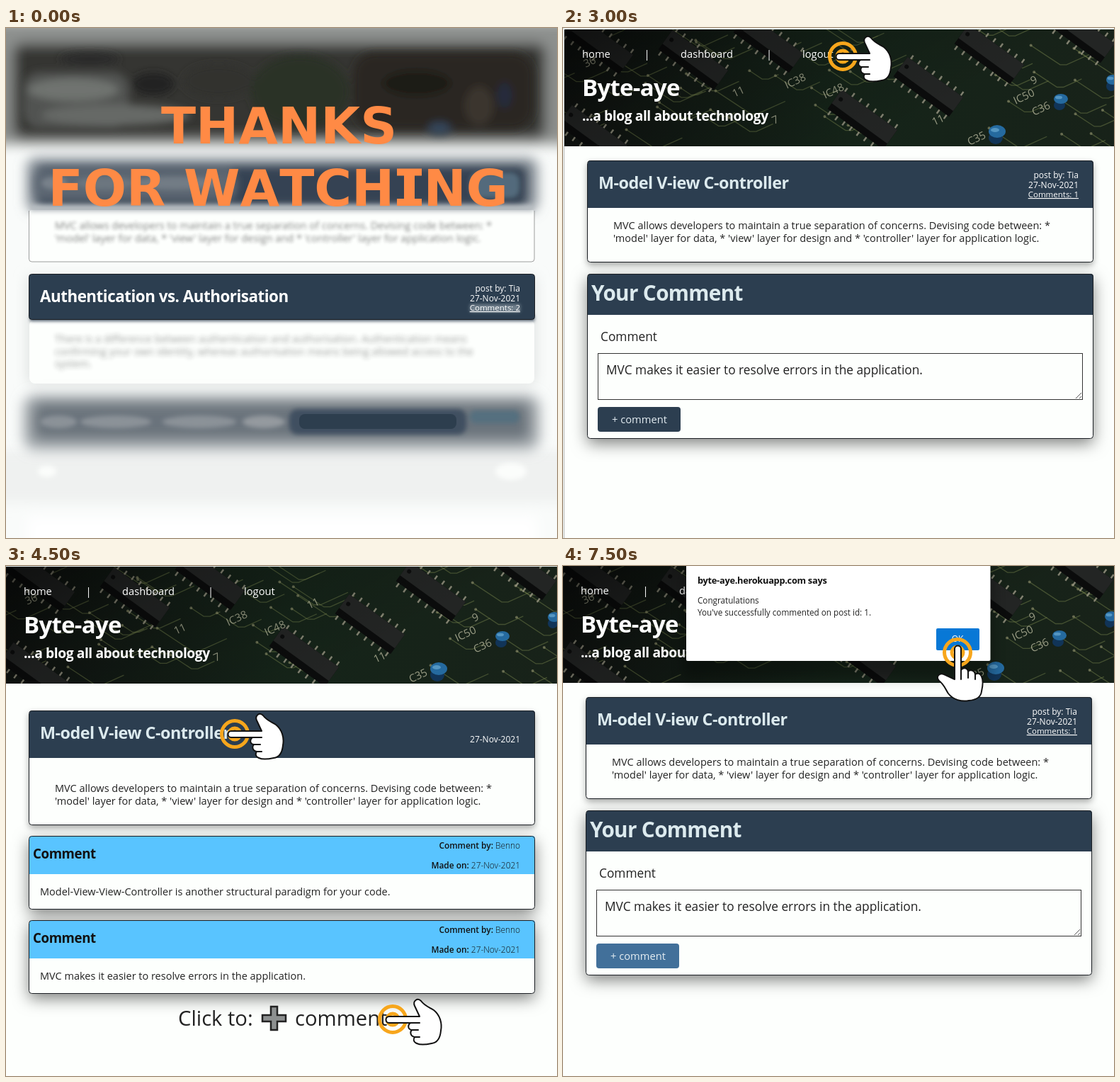
Recreate the animation shown at these times as an HTML page. Size 778 by 720 pixels, loop 8000 ms.

```html
<!DOCTYPE html>
<html lang="en">
<head>
<meta charset="utf-8">
<title>Blog walkthrough</title>
<style>
  html, body { margin: 0; width: 100%; height: 100%; overflow: hidden; background: #fdfffd; }
  svg { display: block; width: 778px; height: 720px; }
  text { font-family: "Open Sans", "Noto Sans", sans-serif; white-space: pre; }
  .b { font-weight: 700; letter-spacing: -.022em; }
  .big text { font: 700 72px "DejaVu Sans", sans-serif; font-kerning: none; }
  .card { filter: drop-shadow(0 4px 5px rgba(0, 0, 0, .36)); }
  .deep { filter: drop-shadow(0 7px 11px rgba(0, 0, 0, .5)); }
</style>
</head>
<body>
<svg id="stage" viewBox="0 0 778 720" xmlns="http://www.w3.org/2000/svg"></svg>
<script>
const NAVY = '#2c3e50', INK = '#222', PALE = '#dceaee';
const stage = document.getElementById('stage');

let seed = 11;
const rnd = () => (seed = (seed * 16807) % 2147483647) / 2147483647;

const text = (x, y, s, size = 14.5, fill = INK, attrs = '') =>
  `<text x="${x}" y="${y}" font-size="${size}" fill="${fill}" ${attrs}>${s}</text>`;
const bold = (x, y, s, size, fill = '#fff') => text(x, y, s, size, fill, 'class="b"');
const right = (y, s, size = 12, fill = '#fff', attrs = '') =>
  text(726, y, s, size, fill, `text-anchor="end" ${attrs}`);
const rect = (x, y, w, h, fill, attrs = '') =>
  `<rect x="${x}" y="${y}" width="${w}" height="${h}" fill="${fill}" ${attrs}/>`;
const oval = (x, y, rx, ry, fill) => `<ellipse cx="${x}" cy="${y}" rx="${rx}" ry="${ry}" fill="${fill}"/>`;
const blur = (n, body) => `<g filter="url(#blur${n})">${body}</g>`;
const lines = (x, y, rows) => rows.map((s, i) => text(x, y + i * 17.5, s)).join('');

const MVC = ['M-odel V-iew C-ontroller', 23.4, [
  "MVC allows developers to maintain a true separation of concerns. Devising code between: *",
  "'model' layer for data, * 'view' layer for design and * 'controller' layer for application logic."]];
const AUTH = ['Authentication vs. Authorisation', 22.4, [
  'There is a difference between authentication and authorisation. Authentication means',
  'confirming your own identity, whereas authorisation means being allowed access to the',
  'system.']];
const ORM = ['Object-Relation Mapping (ORM)', 23.2, [
  "I have really loved learning about ORM's. It's really simplified the way I create queries in SQL."]];
const REMARK = 'MVC makes it easier to resolve errors in the application.';

function board() {
  let s = rect(0, 0, 800, 170, 'url(#pcb)');
  for (let i = 0; i < 60; i++) {
    const x = rnd() * 800 - 40, y = rnd() * 170 - 20, d = 14 + rnd() * 36;
    s += `<path d="M${x} ${y}l${d} ${d * .66}h9l${d * .8} ${-d * .36}" fill="none" stroke="#7d8a50" stroke-width="1.3" opacity=".5"/>`;
    s += `<circle cx="${x}" cy="${y}" r="2" fill="#a3a37c" opacity=".6"/>`;
  }
  const chips = [[48, 22], [182, 44], [288, 20], [40, 150], [421, 128], [514, 82], [600, 36], [728, 6]];
  for (const [x, y] of chips) {
    const pins = side => `<path d="M-44 ${side}H46" stroke="#aaa692" stroke-width="9" stroke-dasharray="2.5 10" opacity=".8"/>`;
    s += `<g transform="translate(${x} ${y}) rotate(36)">${pins(-18)}${pins(20)}` +
      rect(-48, -16, 97, 34, '#0c0d0d') + rect(-48, -16, 97, 24, '#262827') + oval(-41, -4, 3, 3, '#0e0f0f') + '</g>';
  }
  const marks = [['36', 30, 56], ['11', 240, 98], ['IC38', 314, 86], ['IC48', 368, 100], ['11', 428, 62],
    ['IC50', 637, 108], ['C36', 663, 124], ['9', 661, 80], ['C35', 572, 166], ['11', 522, 138], ['7', 296, 136]];
  for (const [m, x, y] of marks)
    s += `<g transform="translate(${x} ${y}) rotate(-25)" opacity=".85">${text(0, 0, m, 15, '#bfc0a4')}</g>`;
  for (const [x, y, w, h] of [[701, 100, 10, 7], [611, 146, 12, 9], [774, 73, 9, 7]])
    s += oval(x - 2, y + 9, w - 2, h, '#12385f') + oval(x, y, w, h, '#2873ad') + oval(x - 3, y - 2, w / 2, h / 3, '#5ba3d3');
  return s + rect(0, 0, 800, 170, 'url(#shade)');
}

function card(y, h, head, fill, cls = 'card') {
  return rect(32.5, y + .5, 714, h - 1, '#fdfffd', `rx="4" class="${cls}"`) +
    `<path d="M33 ${y + head}V${y + 4}q0 -4 4 -4H743q4 0 4 4V${y + head}z" fill="${fill}"/>` +
    rect(32.5, y + .5, 714, h - 1, 'none', 'rx="4" stroke="#1b1f24"');
}

const meta = (y, who, n) => right(y + 25, 'post by: ' + who) + right(y + 39, '27-Nov-2021') +
  right(y + 52, 'Comments: ' + n, 11.5, '#fff', 'text-decoration="underline"');

const post = (y, h, [title, size, rows], who, n, fill) =>
  card(y, h, 67, NAVY) + bold(48, y + 40, title, size, fill) + meta(y, who, n) + lines(69, y + 97, rows);

function comment(y, words) {
  const by = (dy, key, val) => right(y + dy, `<tspan font-weight="600">${key}</tspan> <tspan font-weight="300">${val}</tspan>`, 11.9, '#111');
  return card(y, 104, 54, '#59c4ff', 'deep') + bold(38, y + 32, 'Comment', 18.7, '#111') +
    by(18, 'Comment by:', 'Benno') + by(46, 'Made on:', '27-Nov-2021') + text(48, y + 84, words);
}

function page(dx, dy, member, body) {
  const nav = member ? [['logout', 336]] : [['login', 336], ['|', 420], ['join', 470]];
  const items = [['home', 25], ['|', 112.5], ['dashboard', 164], ['|', 285], ...nav];
  return rect(0, 0, 778, 720, '#fdfffd') + rect(0, 0, 778, 2 + dy, '#e6edec') +
    `<g transform="translate(${dx} ${dy})">` + rect(-1, 3, 1, 720, '#b4b8b6') +
    '<use href="#board" clip-path="url(#top)"/>' +
    items.map(([s, x]) => text(x, 42, s, 14.7, '#fff')).join('') +
    bold(25, 96, 'Byte-aye', 33) + bold(25, 131, '...a blog all about technology', 19.25) + body + '</g>';
}

const posts = () => post(187, 144, MVC, 'Tia', 2) + post(347, 161, AUTH, 'Tia', 2) + post(524, 126, ORM, 'Yurie', 3);

const form = button => post(187, 144, MVC, 'Tia', 1, PALE) + card(347, 233, 58, NAVY, 'deep') +
  bold(38, 385, 'Your Comment', 29.7, PALE) + text(51, 442, 'Comment', 17.3) +
  rect(47.5, 459.5, 684, 65, '#fdfffd', 'stroke="#333"') +
  '<path d="M722 523l8 -8M727 523l3 -3" stroke="#555"/>' + text(59, 489, REMARK, 17.3) +
  rect(47, 535, 117, 35, button, 'rx="4"') + text(67, 558, '+ comment', 14.7, '#e4edf2');

// Pointing hand with target rings; m is the orientation matrix.
const hand = (x, y, m = '1 0 0 1') => `<g transform="matrix(${m} ${x} ${y})">
  <g fill="none" stroke="#f7a61c"><circle r="18.5" stroke-width="5"/><circle r="8" stroke-width="5"/></g>
  <g fill="#fff" stroke="#111" stroke-width="2" stroke-linejoin="round" stroke-linecap="round">
  <path d="M-5 -4H38L31 -19C28 -26 35 -31 40 -26C45 -19 52 -17 58 -13C67 -6 70 6 68 16C67 27 63 33 55 34C46 36 38 36 34 34C29 32 29 28 31 25C25 24 24 18 27 15C21 14 21 8 25 5H-5C-11 5 -11 -4 -5 -4Z"/>
  <path d="M25 5H38M27 15H36M31 25H38" fill="none"/></g></g>`;

function detail() {
  const y = 205;
  return card(y, 162, 67, NAVY) + bold(48, y + 40, MVC[0], MVC[1], PALE) + right(y + 45, '27-Nov-2021') +
    lines(69, y + 115, MVC[2]) +
    comment(382, 'Model-View-View-Controller is another structural paradigm for your code.') + comment(501, REMARK) +
    text(243, 650, 'Click to:', 29.2) + text(408, 650, 'comment', 29.2) +
    '<path d="M374 623h9v12h12v9h-12v12h-9v-12h-12v-9h12z" fill="#8d9090" stroke="#222" stroke-width="2.5"/>';
}

const dialog = () => `<g filter="url(#blur9)" opacity=".3">${rect(170, 8, 437, 150, '#000')}</g>` +
  rect(174, -5, 429.5, 139, '#fff', 'rx="2"') + bold(190, 25, 'byte-aye.herokuapp.com says', 12.8, '#111') +
  text(190, 53, 'Congratulations', 11.7) + text(190, 70, "You've successfully commented on post id: 1.", 11.7) +
  rect(527, 88, 61, 31, '#0878d6', 'rx="2"') + text(557, 107, 'OK', 12, '#fff', 'text-anchor="middle"');

function thanks() {
  const glints = (y, list) => list.map(([x, rx, c]) => oval(x, y, rx, 9, c)).join('');
  return rect(0, 0, 778, 720, '#f9fbfa') +
    blur(9, rect(-30, 596, 840, 74, '#eff1f0') + rect(30, 690, 720, 60, '#fff')) +
    blur(3, oval(58, 626, 13, 8, '#fbfdfb') + oval(713, 626, 22, 12, '#fbfdfb')) +
    blur(9, rect(-30, -10, 838, 174, '#8d908e') + rect(10, 22, 752, 134, '#343632', 'rx="14"')) +
    blur(6, rect(24, 62, 150, 80, '#515351', 'rx="24"') + oval(118, 44, 42, 9, '#2b2c2b') +
      oval(95, 87, 64, 16, '#707370') + oval(155, 123, 105, 15, '#666966') +
      oval(208, 79, 30, 16, '#222423') + oval(415, 90, 70, 52, '#293327') + oval(300, 75, 50, 24, '#30332e') +
      rect(490, 35, 255, 108, '#2a2621', 'rx="30"') + oval(580, 78, 48, 18, '#1f1c19') +
      oval(668, 110, 20, 28, '#3a352f') + oval(704, 95, 10, 18, '#252b3d') + oval(612, 142, 16, 9, '#34465c')) +
    // first card
    blur(9, rect(30, 184, 720, 74, '#78818a', 'rx="12"')) +
    blur(6, rect(44, 196, 690, 54, '#344252', 'rx="10"') + rect(40, 200, 285, 42, '#5d6873', 'rx="14"')) +
    blur(3, glints(219, [[68, 18, '#78818a'], [140, 40, '#6c767f'], [240, 60, '#727c85']]) +
      rect(655, 204, 70, 36, '#526a7b', 'rx="12"')) +
    rect(33, 257, 713, 73, '#fdfffd', 'rx="3"') +
    blur(3, rect(34, 250, 711, 9, '#b8bec2')) +
    `<path d="M32.5 258V326q0 4 4 4H742q4 0 4 -4V258" fill="none" stroke="#777" opacity=".7"/>` +
    `<g filter="url(#blur2)" opacity=".55">${lines(69, 284, MVC[2])}</g>` +
    // second card keeps its header in focus
    blur(9, rect(30, 352, 718, 150, '#dfe2e1')) + rect(33, 412, 713, 90, '#fdfffd', 'rx="8"') +
    blur(2, rect(34, 405, 712, 9, '#536170')) + rect(32.5, 347.5, 714, 64, NAVY, 'rx="4" stroke="#1b1f24"') +
    blur(2, rect(655, 390, 71, 11, '#71808c')) +
    bold(48, 387, AUTH[0], AUTH[1]) + meta(347, 'Tia', 2) +
    `<g filter="url(#blur3)" opacity=".45">${lines(69, 444, AUTH[2])}</g>` +
    // third card
    blur(9, rect(24, 518, 730, 78, '#a5abaf', 'rx="18"') + rect(38, 528, 702, 54, '#6a737c', 'rx="12"')) +
    blur(3, glints(556, [[74, 26, '#8b9298'], [155, 50, '#8b9298'], [273, 52, '#8b9298'], [364, 30, '#949a9f']]) +
      rect(400, 538, 250, 36, '#405060', 'rx="12"') + rect(655, 540, 70, 18, '#55707f', 'rx="8"')) +
    rect(414, 545, 222, 21, '#2d3e4e', 'rx="8"') +
    '<g class="big" fill="#ff8a45"><text x="219" y="163">THANKS</text><text x="59.5" y="251">FOR</text><text x="251" y="251">WATCH</text>' +
    '<path d="M552 198.500h35v10h-10v32.500h10v10h-35v-10h10v-32.500h-10z"/><text x="589.500" y="251">NG</text></g>';
}

const blurs = [2, 3, 6, 9].map(n =>
  `<filter id="blur${n}" filterUnits="userSpaceOnUse" x="-60" y="-60" width="900" height="840"><feGaussianBlur stdDeviation="${n}"/></filter>`).join('');
const defs = `<defs>${blurs}
  <linearGradient id="pcb"><stop offset="0" stop-color="#111512"/><stop offset=".5" stop-color="#17271b"/><stop offset="1" stop-color="#1a251b"/></linearGradient>
  <linearGradient id="shade" x2=".8" y2=".3"><stop offset="0" stop-opacity=".6"/><stop offset=".4" stop-opacity=".25"/><stop offset="1" stop-opacity=".08"/></linearGradient>
  <clipPath id="top"><rect x="0" y="2" width="800" height="165"/></clipPath>
  <g id="board">${board()}</g></defs>`;

const scenes = [
  thanks(),
  page(0, 0, false, posts()),
  page(2, 0, true, form(NAVY)) + hand(395, 40),
  page(0, -1, true, detail()) + hand(323, 237) + hand(546, 640),
  page(1, -2, true, posts()) + hand(645, 240, '-1 0 0 1'),
  page(0, -2, true, form('#42709a')) + dialog() + hand(557, 122, '0 1 1 0')
];
stage.innerHTML = defs + scenes.map(s => `<g class="scene" display="none">${s}</g>`).join('');
const groups = stage.querySelectorAll('.scene');

let shown = -1;
function draw(ms) {
  const now = Math.floor((ms % 8000) / 1500);
  if (now === shown) return;
  groups.forEach((g, i) => g.setAttribute('display', i === now ? 'inline' : 'none'));
  shown = now;
}

const start = performance.now();
function tick() {
  draw(performance.now() - start);
  requestAnimationFrame(tick);
}
tick();
</script>
</body>
</html>
```
